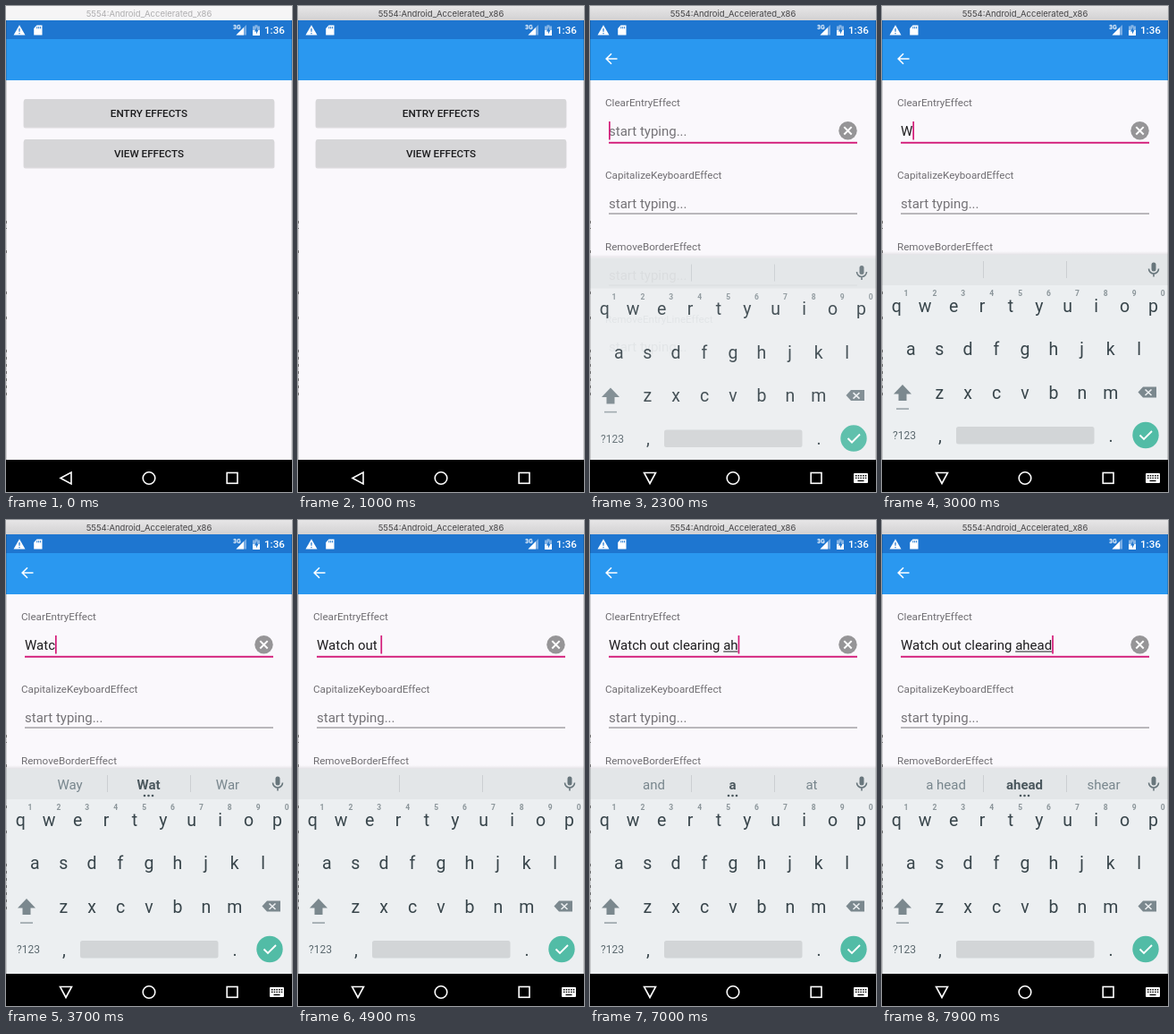
An HTML page for the animation above (8 s loop, 320 by 543 pixels).

```html
<!DOCTYPE html>
<html lang="en">
<head>
<meta charset="utf-8">
<title>Entry effects</title>
<style>
  html, body { margin: 0; width: 100%; height: 100%; overflow: hidden; background: #faf8fc; }
  svg { display: block; width: 320px; height: 543px; font-family: Roboto, sans-serif; }
  text { white-space: pre; }
  .mid { text-anchor: middle; }
  .button text { font-size: 11.67px; font-weight: 500; fill: #1b1b1d; }
  .label { font-size: 11.67px; fill: #6f6d71; }
  .entry { font-size: 15px; fill: #757377; }
  .key { font-size: 19.5px; fill: #38454b; }
  .hint { font-size: 8.5px; font-weight: 700; fill: #8b959a; }
  .pick { font-size: 15px; fill: #78868d; }
  .line { fill: none; stroke: #fff; stroke-width: 1.6; }
</style>
</head>
<body>
<svg viewBox="0 0 320 543">
  <defs>
    <linearGradient id="chrome" x2="0" y2="1">
      <stop stop-color="#e7e6e7"/><stop offset="1" stop-color="#d2d1d2"/>
    </linearGradient>
    <linearGradient id="shade" x2="0" y2="1">
      <stop stop-color="#000" stop-opacity="0"/><stop offset="1" stop-color="#000" stop-opacity=".09"/>
    </linearGradient>
    <clipPath id="press"><rect x="20" y="104" width="280" height="31" rx="2"/></clipPath>
  </defs>
  <rect width="320" height="543" fill="#faf8fc"/>
  <g id="home"></g>
  <g id="form"></g>
  <g id="keyboard"></g>

  <rect y="36" width="320" height="47" fill="#2a98f0"/>
  <rect y="16" width="320" height="21" fill="#1e76d0"/>
  <path id="arrow" class="line" d="M30.5 59H18.5M24 53.2L18.2 59L24 64.8"/>
  <path d="M15 21.3L21.5 32.5H8.500Z" fill="#fff"/>
  <path d="M15 25V28.800M15 30V31.300" stroke="#1e76d0" stroke-width="1.2"/>
  <path d="M34.500 21.500H40.500V32.500H31.200V25Z" fill="#fff"/>
  <path d="M34.800 23V25.400M36.700 23V25.400M38.600 23V25.400" stroke="#1e76d0" stroke-width=".9"/>
  <text x="254" y="25.500" font-size="7" font-weight="700" fill="#fff">3G</text>
  <path d="M269 21V32.500H257.500Z" fill="#fff" opacity=".4"/>
  <path d="M266 24V32.500H257.500Z" fill="#fff"/>
  <path d="M278.500 21.200H281.500V22.500H284V33H276V22.500H278.500Z" fill="#fff" opacity=".45"/>
  <path d="M276 27H284V33H276Z" fill="#fff"/>
  <path d="M280.800 23.500L278 28.500H280V31.500L282.500 26.800H280.800Z" fill="#1e76d0"/>
  <text x="289" y="31" font-size="11.67" font-weight="500" fill="#fff">1:36</text>

  <rect id="bar" width="320" height="16"/>
  <text id="title" class="mid" x="160" y="12" font-size="9.5" style="font-family:Inter,sans-serif">5554:Android_Accelerated_x86</text>

  <rect y="507" width="320" height="36"/>
  <path id="back" class="line"/>
  <circle class="line" cx="160" cy="527.500" r="6.800"/>
  <rect class="line" x="247.200" y="521.500" width="11.800" height="11.800"/>
  <g id="switcher">
    <rect x="295" y="522" width="16" height="11" rx="1" fill="#fff"/>
    <path d="M297 524.800H309.500M297 527.400H309.500" stroke="#000" stroke-width="1.400" stroke-dasharray="1.500 1.200"/>
    <path d="M299.500 530.500H306.500" stroke="#000" stroke-width="1.300"/>
  </g>
  <path d="M.5 16V507M319.500 16V507" stroke="#000" stroke-opacity=".16"/>
  <path d="M.5 240V249M.5 273V279M.5 319V324M.5 347V351M.5 384V440" stroke="#333" stroke-opacity=".6" stroke-dasharray="3 5"/>
</svg>
<script>
const LOOP = 8000;
const $ = id => document.getElementById(id);
const clamp = v => Math.max(0, Math.min(1, v));
const text = (x, y, cls, s, more = '') => `<text x="${x}" y="${y}" class="${cls}" ${more}>${s}</text>`;

// First page
const button = (y, s) => `<g class="button">
  <rect x="19.500" y="${y + 1}" width="281" height="31.500" rx="2.500" fill="#000" opacity=".12"/>
  <rect x="20" y="${y}" width="280" height="31" rx="2" fill="#d6d6d8"/>
  ${text(160, y + 20, 'mid', s)}</g>`;
$('home').innerHTML = button(104, 'ENTRY EFFECTS') + button(149, 'VIEW EFFECTS') +
  '<circle id="ripple" cx="160" cy="119" clip-path="url(#press)" fill="#000" opacity=".13"/>';

// Second page
const rows = ['ClearEntryEffect', 'CapitalizeKeyboardEffect', 'RemoveBorderEffect', 'RemoveEntryLineEffect'];
const labelY = [112, 193, 273, 353.5];
$('form').innerHTML = rows.map((name, i) => {
  const y = labelY[i];
  const rule = i < 3 ? `<rect class="rule" x="21" y="${y + 38.5}" width="278" height="1" fill="#7b797d"/>` : '';
  return text(17, y, 'label', name) + text(21, y + 32.5, 'entry', 'start typing...') + rule;
}).join('') + `
  <rect id="focus" x="21" y="151.800" width="278" height="1.900" fill="#d31a78"/>
  <text id="typed" x="21" y="144.500" font-size="15" fill="#1d1c1e"></text>
  <rect id="compose" y="146.500" height="1" fill="#1d1c1e"/>
  <rect id="caret" y="129" width="1.700" height="20.500" fill="#d31a78"/>
  <circle cx="288.500" cy="139.300" r="10.200" fill="#969597"/>
  <path d="M284.300 135.100L292.700 143.500M292.700 135.100L284.300 143.500" stroke="#fff" stroke-width="2"/>`;
const placeholder = document.querySelector('.entry');

// Keyboard
const keyRow = (letters, x, y) =>
  [...letters].map((c, i) => text(x + i * 31.9, y, 'key mid', c)).join('');
$('keyboard').innerHTML = `
  <rect y="274" width="320" height="4" fill="url(#shade)"/>
  <rect y="278" width="320" height="242" fill="#eceff1"/>
  <rect y="278" width="320" height="34" fill="#e3e6e8"/>
  <path d="M113.500 285V304M206.500 285V304" stroke="#cbcfd2"/>
  ${[71.5, 159.5, 248].map(x => text(x, 300.5, 'pick mid', '')).join('')}
  <g id="dots" fill="#4b585e"><circle cx="155" cy="308" r="1.300"/><circle cx="159.500" cy="308" r="1.300"/><circle cx="164" cy="308" r="1.300"/></g>
  <rect x="301.500" y="286.500" width="5" height="10" rx="2.500" fill="#68767c"/>
  <path d="M298.500 293.500A5.500 5.500 0 0 0 309.500 293.500M304 299V302.500" fill="none" stroke="#68767c" stroke-width="1.600"/>
  ${keyRow('qwertyuiop', 16.3, 341.5)}${keyRow('asdfghjkl', 32.3, 390)}${keyRow('zxcvbnm', 64.3, 438.5)}
  ${[...'1234567890'].map((c, i) => text(27 + i * 31.9, 324, 'hint mid', c)).join('')}
  <path d="M23 423L33 433.500H27.500V441H18.500V433.500H13Z" fill="#7b888e"/>
  <rect x="16" y="449.300" width="14" height="1.600" fill="#9aa4a9"/>
  <path d="M292 425.500H307V437.500H292L286.500 431.500Z" fill="#7b888e"/>
  <path d="M294.500 428.500L301.500 435M301.500 428.500L294.500 435" stroke="#eceff1" stroke-width="1.600"/>
  ${text(25, 484, 'mid', '?123', 'font-size="12" fill="#5d6a70"')}
  ${text(65, 486.5, 'key mid', ',')}${text(256, 486.5, 'key mid', '.')}
  <rect x="83" y="470" width="154.500" height="19.500" rx="2.500" fill="#d2d5d7"/>
  <circle cx="295" cy="479.500" r="14.700" fill="#52bca6"/>
  <path d="M288.500 479.500L293 484L302 475" fill="none" stroke="#fff" stroke-width="1.900"/>`;
const picks = [...document.querySelectorAll('.pick')];

// Typing: key times and the suggestions after each key; * marks a bold centre word
const phrase = 'Watch out clearing ahead';
const keyTimes = [2980, 3190, 3390, 3660, 3880, 4000, 4280, 4480, 4590, 4790, 5090, 5290,
  5480, 5590, 5780, 5880, 5980, 6280, 6480, 6690, 6980, 7180, 7380, 7580];
const words = ['', 'We|W|Was', 'Was|Wa|Way', 'Way|*Wat|War', 'Watch|Watc|Water', 'Watched|*Watch|Water', '',
  'of|o|on', 'out|ou|our', 'put|*out|outer', '',
  'can|c|come', 'call|cl|close', 'clear|cle|clean', 'clear|clea|clean', 'clearly|*clear|clean',
  'clearing|cleari|clear I', 'clearing|clearin|clear in', 'cleaning|*clearing|clear', '',
  'and|*a|at', 'ah|*ah|have', 'ahead|ahe|she', 'ahead|ahea|shea', 'a head|*ahead|shear'];
const countAt = t => keyTimes.filter(k => k <= t).length;

function zoom(el, scale, alpha) {
  el.setAttribute('transform', `translate(160 295) scale(${scale}) translate(-160 -295)`);
  el.setAttribute('opacity', alpha);
}
const show = (el, on) => el.setAttribute('visibility', on ? 'inherit' : 'hidden');

function drawPages(t) {
  const p = clamp((t - 1400) / 300), e = 1 - (1 - p) ** 2.5;
  zoom($('home'), 1 - .025 * e, (1 - p) ** 1.5);
  zoom($('form'), 1.125 - .125 * e, clamp(p * 1.5));
  $('ripple').setAttribute('r', 150 * clamp((t - 1220) / 180));
  show($('arrow'), p > 0);
}

function drawTyping(t) {
  const n = countAt(t), typed = phrase.slice(0, n), focused = t >= 2180;
  const el = $('typed');
  el.textContent = typed;
  const width = n ? el.getComputedTextLength() : 0;
  const start = typed.lastIndexOf(' ') + 1;
  const left = start ? el.getSubStringLength(0, start) : 0;
  const composing = start > 0 && n > start;
  $('compose').setAttribute('x', 21 + left);
  $('compose').setAttribute('width', composing ? width - left : 0);
  $('caret').setAttribute('x', 21 + width);
  const since = t - (n ? keyTimes[n - 1] : 2180);
  show($('caret'), focused && since % 1000 < 520);
  show($('focus'), focused);
  show(document.querySelector('.rule'), !focused);
  show(placeholder, !n);

  const list = words[countAt(t - 100)].split('|');
  picks.forEach((pick, i) => {
    const word = list[i] || '';
    pick.textContent = word.replace('*', '');
    pick.style.fontWeight = word[0] === '*' ? 700 : 400;
    pick.style.fill = i === 1 ? '#4b585e' : '#78868d';
  });
  show($('dots'), list.length > 1);
}

function drawKeyboard(t) {
  const q = clamp((t - 2150) / 230), rest = (1 - q) ** 2;
  const kb = $('keyboard');
  kb.setAttribute('transform', `translate(0 ${30 * rest})`);
  kb.setAttribute('opacity', q > 0 ? 1 - .65 * rest : 0);
  show($('switcher'), q > 0);
  $('back').setAttribute('d', q > 0 ? 'M60.500 521.500H73.500L67 533.500Z' : 'M61 527.500L73 521V534Z');
}

function draw(t) {
  const active = t >= 700;
  $('bar').setAttribute('fill', active ? 'url(#chrome)' : '#f6f5f6');
  $('title').setAttribute('fill', active ? '#454446' : '#aeadaf');
  drawPages(t);
  drawTyping(t);
  drawKeyboard(t);
}

const begin = performance.now();
function tick() {
  draw((performance.now() - begin) % LOOP);
  requestAnimationFrame(tick);
}
tick();
</script>
</body>
</html>
```
